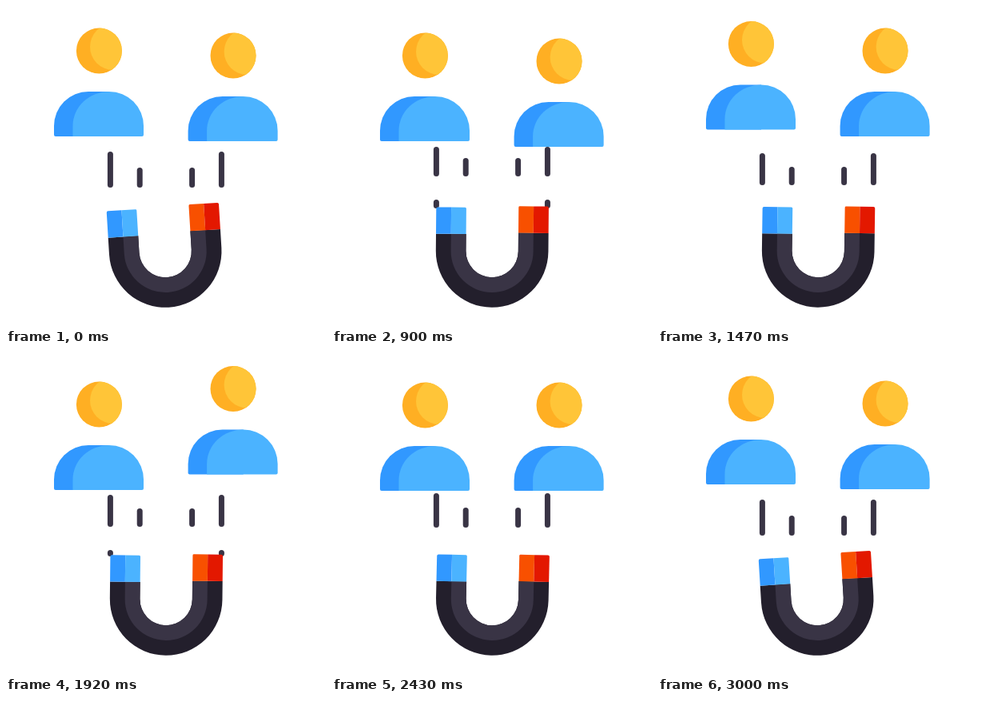
Recreate the animation shown at these times as an HTML page. Size 400x400 px, loop 3030 ms.

```html
<!DOCTYPE html>
<html lang="en">
<head>
<meta charset="utf-8">
<title>Magnet attracting people</title>
<style>
  html, body { margin: 0; width: 100%; height: 100%; overflow: hidden; background: #fff; }
  svg { display: block; width: 100%; height: 100%; }
</style>
</head>
<body>
<svg viewBox="0 0 400 400">
  <defs>
    <clipPath id="headClip"><circle cx="116.4" cy="0" r="28.5"/></clipPath>
    <g id="person">
      <circle cx="116.4" cy="0" r="28.5" fill="#ffaf23"/>
      <circle cx="134" cy="-5" r="29" fill="#ffc538" clip-path="url(#headClip)"/>
      <path fill="#3198ff" d="M60 94A43 43 0 0 1 103 51H129V107H62Q60 107 60 105Z"/>
      <path fill="#4bb3ff" d="M83.5 107V94A45.5 43 0 0 1 129 51A43 43 0 0 1 172 94V105Q172 107 170 107Z"/>
    </g>
  </defs>
  <g id="lines" stroke="#393445" stroke-width="7" stroke-linecap="round"></g>
  <g id="magnet">
    <path fill="#231f2c" d="M129.7 285.3V306.5A70.3 70.3 0 0 0 270.3 306.5V283.3H232.7V306.5A32.7 32.7 0 0 1 167.3 306.5V285.3Z"/>
    <path fill="#393445" d="M148.5 285.3V306.5A51.5 51.5 0 0 0 251.5 306.5V283.3H232.7V306.5A32.7 32.7 0 0 1 167.3 306.5V285.3Z"/>
    <path fill="#3198ff" d="M148.5 252V285.3H129.7V254Q129.7 252 131.7 252Z"/>
    <path fill="#4bb3ff" d="M148.5 252H165.8Q167.3 252 167.3 253.5V285.3H148.5Z"/>
    <path fill="#f85000" d="M251.5 250V283.3H232.7V251.5Q232.7 250 234.2 250Z"/>
    <path fill="#e31800" d="M251.5 250H268.3Q270.3 250 270.3 252V283.3H251.5Z"/>
  </g>
  <use id="left" href="#person"/>
  <use id="right" href="#person"/>
</svg>
<script>
const LOOP = 3030, STEP = 30, CYCLE = 3000;
const TIMES = [0, 450, 900, 1470, 1920, 2430];
const byId = id => document.getElementById(id);

// Smooth periodic curve through the given values.
function curve(values, times = TIMES) {
  const n = values.length;
  const at = i => {
    const k = (i + n) % n;
    return [times[k] + Math.floor(i / n) * CYCLE, values[k]];
  };
  const slope = i => {
    const [t0, a] = at(i - 1), [t1, b] = at(i + 1);
    return (b - a) / (t1 - t0);
  };
  return t => {
    t %= CYCLE;
    let i = n - 1;
    while (times[i] > t) i--;
    const [t0, a] = at(i), [t1, b] = at(i + 1);
    const h = t1 - t0, u = (t - t0) / h, v = 1 - u;
    return v * v * (1 + 2 * u) * a + u * u * (3 - 2 * u) * b
         + h * u * v * (v * slope(i) - u * slope((i + 1) % n));
  };
}

const leftY = curve([56, 67.5, 62, 47.5, 63, 64]);
const rightY = curve([62, 51, 69, 56, 41.8, 43.5, 64], [0, 450, 900, 1470, 1830, 1920, 2430]);
const tilt = curve([-3.5, 2.9, 0.5, 0.8, 0.6, 1.3]);
const longTop = curve([182, 176, 176, 184, 176, 174]);
const shortTop = curve([202, 195, 190, 201, 193, 192]);
const lineEnd = curve([227, 220, 213, 224, 216, 217]);
const nextTop = curve([256, 252, 242, 252.5, 245, 253]);

function addLine(x) {
  const el = document.createElementNS("http://www.w3.org/2000/svg", "line");
  el.setAttribute("x1", x);
  el.setAttribute("x2", x);
  byId("lines").append(el);
  return el;
}

const OUTER = [130.4, 269.4], INNER = [167.2, 232.6];
const longs = OUTER.map(addLine);
const shorts = INNER.map(addLine);
const nexts = OUTER.map(addLine);

function span(lines, top, bottom) {
  for (const el of lines) {
    el.setAttribute("y1", top + 3.5);
    el.setAttribute("y2", bottom - 3.5);
    el.style.display = bottom - top >= 7 ? "" : "none";
  }
}

function draw(t) {
  byId("left").setAttribute("transform", `translate(0 ${leftY(t)})`);
  byId("right").setAttribute("transform", `translate(167.6 ${rightY(t)})`);
  byId("magnet").setAttribute("transform", `rotate(${tilt(t)} 200 320)`);
  span(longs, longTop(t), lineEnd(t));
  span(shorts, shortTop(t), lineEnd(t));
  span(nexts, nextTop(t), 253);
}

function tick() {
  draw(Math.floor(performance.now() % LOOP / STEP) * STEP);
  requestAnimationFrame(tick);
}
tick();
</script>
</body>
</html>
```
